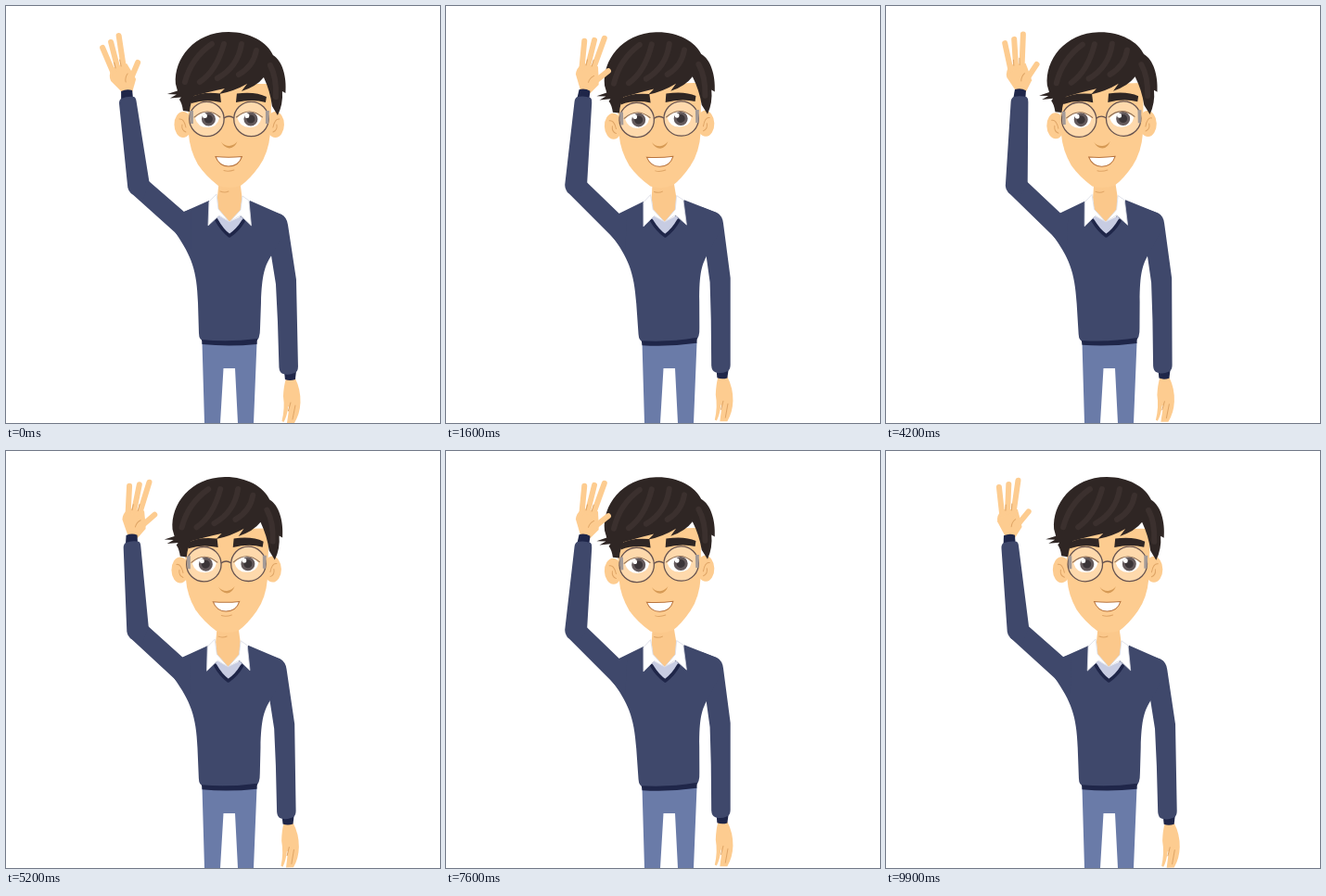
Animation of 468x450 px, one loop 10000 ms. Source, as an HTML page:

```html
<!DOCTYPE html>
<html lang="en">
<head>
<meta charset="utf-8">
<title>Waving man</title>
<style>
  html, body { margin: 0; width: 100%; height: 100%; overflow: hidden; background: #fff; }
  svg { display: block; width: 468px; height: 450px; }
  .skin { fill: #fdcc90; }
  .neck { fill: #fbc88b; }
  .wool { fill: #3f486b; }
  .dark { fill: #1f2649; }
  .hair { fill: #2f2624; }
  .line { fill: none; stroke-linecap: round; stroke-linejoin: round; }
  .crease { stroke: #dfa566; stroke-width: 1; }
  .finger { stroke: #fdcc90; stroke-width: 6; }
</style>
</head>
<body>
<svg viewBox="0 0 468 450">
  <path fill="#6a7ba8" d="M211.500 363H270.500L267 450H250L247 391H234.500L231 450H214Z"/>

  <g id="body">
    <g id="rightArm">
      <g id="rightHand">
        <path class="skin" d="M302 402L312 402Q318 414 317.500 428Q317 440 311 450H303L305.500 433L304.500 432Q303 443 299.500 449L297.500 448Q301 434 299 421Q299.500 410 302 402Z"/>
        <path class="line crease" d="M312 431L309 446M307 428L304.500 437"/>
      </g>
      <path class="dark" d="M300 394H313L312 403Q306 405 301 403Z"/>
      <path class="wool" d="M280 219L297 225Q303 228 304 236L313 295L315 389Q315 395 311 396Q305 399 299 397Q295 396 294.500 390L293 340L291 300L286 269L276 250Z"/>
    </g>

    <path class="neck" d="M230 186H252L254.500 206L253 222L241 234L229 222L228 206Z"/>
    <path class="line crease" d="M231 200Q236 202 240 200"/>
    <path class="wool" d="M219 210L192 222L180 240L183 245C200 270 206 285 207 320L208 353Q208 361 214 362H269Q274 360 274 348L275 320C276 290 279 280 287 268L303 240Q303 228 297 225L263 210L241 247Z"/>
    <path class="dark" d="M211 360Q240 363 271 359L270.500 365Q240 368 211.500 365Z"/>
    <path fill="#c7cce2" d="M229 226L241 233L254 227L257 232L241 248L226 232Z"/>
    <path class="line" stroke="#1f2649" stroke-width="3.600" d="M227 231Q233 242 241 248Q250 242 256 232"/>
    <path fill="#fff" stroke="#d9dbe4" stroke-width=".8" d="M227 203L219 211L218 237L230 226L241 233L229 219ZM255 205L262 210L264.500 237L253 226L241 233L253 220Z"/>

    <g id="head">
      <ellipse class="skin" cx="191" cy="128" rx="9.500" ry="14"/>
      <ellipse class="skin" cx="290.500" cy="128" rx="9.500" ry="14"/>
      <path class="line crease" d="M187 122Q192 121 194 131M190 128Q189 134 194 136M295 122Q290 121 288 131M292 128Q293 134 288 136"/>
      <path class="skin" d="M196 84H287L285 138Q283 159 273 173Q263 187 253 194Q241 198 229 194Q215 183 207 171Q198 155 197 138Z"/>
      <path class="hair" d="M174 95L185 91.500L183 84C181 57 203 28 240 28C263 28 282 39 288 53C298 59 303 76 301.500 94L298 92Q299 106 293 118L287 108Q285 92 278 77Q270 87 254 92L260 84Q246 92 230 95L236 89Q217 93 203 97Q199 104 198 114L191 113Q190 105 187 101L189 98.500L177 99.500L184 95.500Z"/>
      <g class="line" stroke="#403532" stroke-width="6" opacity=".7">
        <path d="M193 82Q200 56 222 41M209 82Q227 70 235 41M228 78Q250 66 254 41M251 74Q267 65 270 48M285 64Q292 77 291 98"/>
      </g>
      <path class="hair" d="M199 99Q211 92 231 94.500L232 104Q215 100 200 105ZM281 98Q269 92 249 94.500L248 104Q266 100 280 104Z"/>

      <g stroke="#665350" stroke-width="1.300" fill="#fff" fill-opacity=".25">
        <circle cx="216.500" cy="122" r="18.700"/>
        <circle cx="264.500" cy="122" r="18.700"/>
        <path fill="none" d="M235 121Q240.500 117 246 121"/>
      </g>
      <path fill="#a39a97" d="M198 113H202V127H199ZM284 113H280V127H283Z"/>
      <g id="eye">
        <path fill="#fff" d="M204 121Q217 107 230 121Q228 131 217 131Q207 131 204 121Z"/>
        <circle cx="218.500" cy="122" r="7.500" fill="#645a5c"/>
        <circle cx="218.500" cy="122" r="4.500" fill="#3b3538"/>
        <circle cx="214.500" cy="118.500" r="2.500" fill="#fff"/>
        <path class="line" stroke="#8a6a52" stroke-width="1" d="M203 120Q217 108 231 120"/>
      </g>
      <use href="#eye" x="45.500"/>

      <path fill="#d69a55" d="M232 146.500Q235 151 241 151Q247 150 249.500 146Q247 153 241 153.500Q235 153 232 146.500Z"/>
      <path fill="#fff" stroke="#b9753f" stroke-width="1" d="M226 162.500Q240 164 254.500 162.500Q251 173 240 173Q230 173 226 162.500Z"/>
      <path class="line crease" d="M235 177.500Q240 179 246 177"/>
    </g>

    <g id="upperArm">
      <path class="wool" d="M200 219L192 222L154 189L134 201L183 245L200 262Z"/>
      <g id="forearm">
        <g id="leftHand">
          <path class="skin" d="M125 93L113 81Q110 75 114 67L130 62L138 75L140 79L136 93Z"/>
          <path class="line finger" d="M115.500 72L104 45M120.500 68L113 39M127 68L121.500 32M134 80L142 61"/>
          <path class="line crease" d="M118 67L116.500 61M124 65L122.500 58M131 73Q128 77 129 82"/>
        </g>
        <path class="dark" d="M124 92Q130 89 136 91L137 101L124 102Z"/>
        <path class="wool" d="M124 100Q131 97 138 98Q140 99 140.500 103L154.500 190L148 208L136 203Q131 199 131 193L122 106Q121.500 102 124 100Z"/>
      </g>
    </g>
  </g>
</svg>
<script>
  const PERIOD = 2000 / 3, STEP = 100, LOOP = 10000;
  const pivots = {
    body: [240, 365], head: [240, 210], upperArm: [188, 232], forearm: [143, 195],
    leftHand: [130, 93], rightArm: [292, 238], rightHand: [306, 401]
  };
  const rad = deg => deg * Math.PI / 180;

  function turn(id, deg, dx = 0) {
    document.getElementById(id)
      .setAttribute("transform", `translate(${dx} 0) rotate(${deg} ${pivots[id]})`);
  }

  function draw(ms) {
    const phase = ms / PERIOD * 360;
    const sway = (1 - Math.cos(rad(phase + 9))) / 2;
    // The hand trails the arm and rests briefly at each end.
    const lag = (1 - Math.sin(Math.PI / 2 * Math.cos(rad(phase - 33)))) / 2;
    turn("body", -2.4 * sway);
    turn("head", 0.6 * sway, -2.2 * sway);
    turn("upperArm", 5.6 * sway);
    turn("forearm", 10 * sway);
    turn("leftHand", 38 * lag - 0.6 - 13.2 * sway);
    turn("rightArm", 3.7 * sway);
    turn("rightHand", -3 * lag);
  }

  const start = performance.now();
  function tick() {
    const ms = (performance.now() - start) % LOOP;
    draw(Math.floor(ms / STEP) * STEP);
    requestAnimationFrame(tick);
  }
  tick();
</script>
</body>
</html>
```
